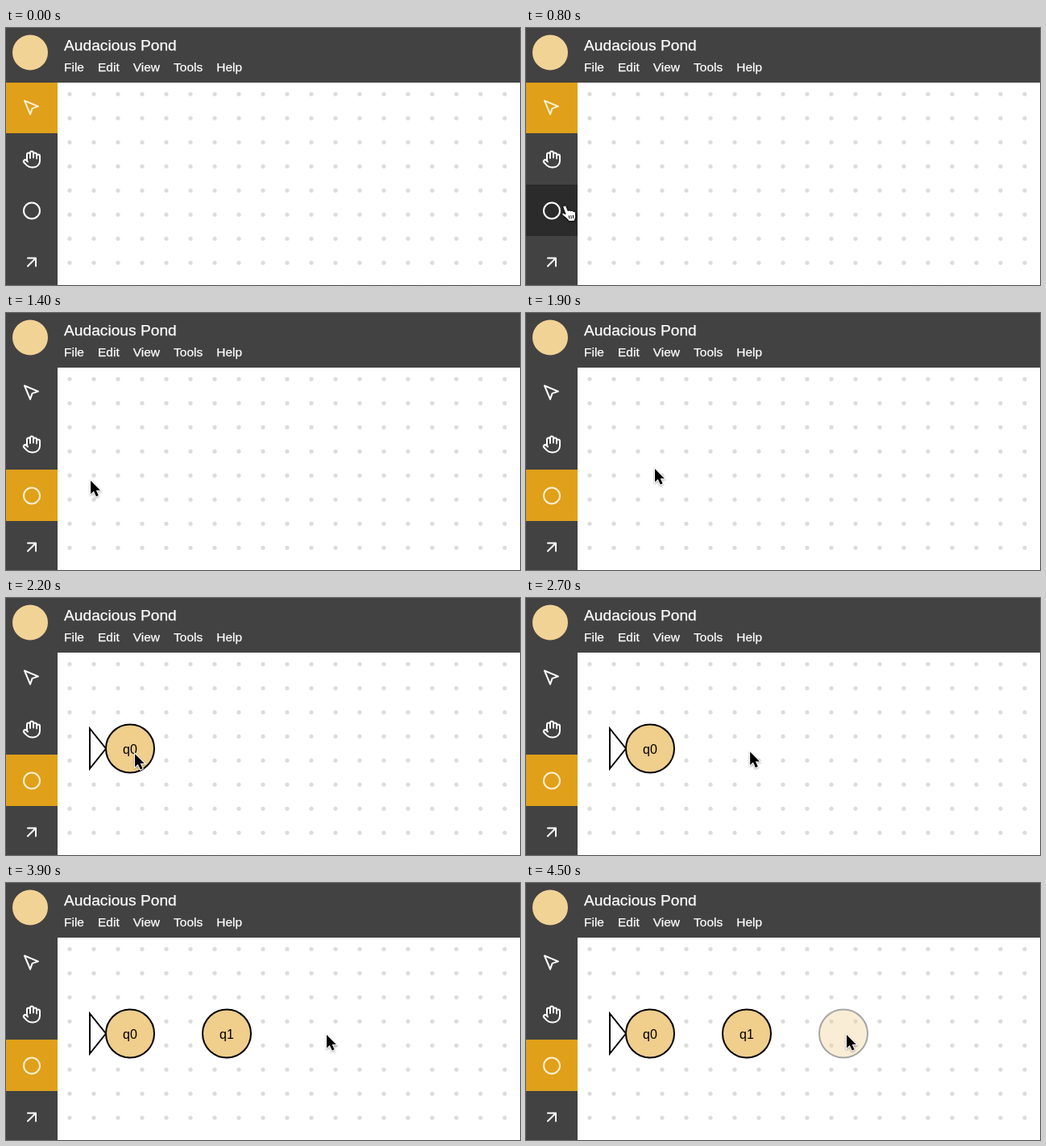
An HTML page for the animation above (4.6 s loop, 638 by 320 pixels).

```html
<!DOCTYPE html>
<html lang="en">
<head>
<meta charset="utf-8">
<title>Audacious Pond</title>
<style>
  html, body { margin: 0; width: 100%; height: 100%; overflow: hidden; background: #fff; }
  svg { display: block; }
  text { font: 15.5px "Liberation Sans", Arial, sans-serif; }
  .title { font-size: 19.2px; }
  .light { fill: #fff; stroke: #fff; stroke-width: .25; }
  .row rect { fill: none; }
  .row.hover rect { fill: #2b2b2b; }
  .row.on rect { fill: #e0a01a; }
  .icon { fill: none; stroke: #fff; stroke-width: 2; stroke-linecap: round; stroke-linejoin: round; }
  .row.on .icon { stroke: #fbf0d4; }
  .state { stroke: #000; stroke-width: 2; fill: #f0ce8c; }
  .state text { font-size: 16px; fill: #000; stroke: none; text-anchor: middle; }
  .ghost { opacity: .35; }
  .ghost text { display: none; }
  .cursor { filter: drop-shadow(0 1px 1px rgba(0, 0, 0, .35)); }
</style>
</head>
<body>
<svg width="638" height="320" viewBox="0 0 638 320">
  <defs>
    <pattern id="grid" x="64" y="67" width="30" height="30" patternUnits="userSpaceOnUse">
      <circle cx="15" cy="15.300" r="2.600" fill="#dcdcdc"/>
    </pattern>
  </defs>
  <rect width="638" height="320" fill="#fff"/>
  <rect x="64" y="67" width="574" height="253" fill="url(#grid)"/>

  <g id="states"></g>

  <rect width="64" height="320" fill="#424242"/>
  <g id="tools"></g>

  <rect width="638" height="68" fill="#424242"/>
  <circle cx="30" cy="30.500" r="22" fill="#f2d396"/>
  <g class="light">
    <text class="title" x="72" y="28">Audacious Pond</text>
    <text x="72" y="54">File<tspan dx="17">Edit</tspan><tspan dx="17">View</tspan><tspan dx="17">Tools</tspan><tspan dx="17">Help</tspan></text>
  </g>

  <g id="ring" fill="none">
    <circle cx="43" cy="222" r="38" stroke="#fff" stroke-width="3"/>
    <circle cx="43" cy="222" r="38" stroke="#000" stroke-width="1.500"/>
  </g>
  <g id="arrow" class="cursor">
    <path d="M0 0V16.500L3.800 13L6.800 19.600L9.600 18.300L6.700 11.900H11.800Z" fill="#000" stroke="#fff" stroke-width="2" paint-order="stroke"/>
  </g>
  <g id="hand" class="cursor">
    <path d="M-3.200 1C-3.500 -1 0 -1.800 1 .4L3.300 5.800C3.800 4.500 6.100 4.600 6.600 6C7.400 5 9.300 5.200 9.700 6.700C10.700 6 12.200 6.800 12.400 8.200L12.800 13L11.300 18.500H4L2.500 16L-3.700 11C-5.200 9.400 -3.300 7.600 -1.600 8.800L0 10Z" fill="#fff" stroke="#000" stroke-linejoin="round"/>
    <path d="M4.200 11.500l.8 4M6.800 11.300l.6 4M9.400 11l.4 4" fill="none" stroke="#000"/>
  </g>
</svg>
<script>
  const LOOP = 4600, STEP = 100, SIDE = 64, TOP = 67;
  const icons = [
    "M3 3l7.07 16.97 2.51-7.39 7.39-2.51z",
    "M18 11V6a2 2 0 0 0-4 0M14 10V4a2 2 0 0 0-4 0v2M10 10.5V6a2 2 0 0 0-4 0v8M18 8a2 2 0 1 1 4 0v6a8 8 0 0 1-8 8h-2c-2.8 0-4.5-.86-5.99-2.34l-3.6-3.6a2 2 0 0 1 2.83-2.82L7 15",
    "M2 12a10 10 0 1 0 20 0a10 10 0 1 0-20 0",
    "M7 17L17 7M7 7h10v10"
  ];
  const entry = { x: 242, y: 302 };
  const moves = [
    { from: 100, to: 600, x: 24, y: 197 },
    { from: 700, to: 800, x: 49, y: 222 },
    { from: 800, to: 1000, x: 45, y: 225 },
    { from: 1260, to: 1900, x: 160, y: 194 },
    { from: 2200, to: 2900, x: 281, y: 191.5 },
    { from: 3300, to: 3900, x: 398, y: 189 }
  ];

  const el = id => document.getElementById(id);
  const show = (node, on) => { node.style.display = on ? "" : "none"; };
  const easeOut = k => 1 - (1 - k) ** 3;
  const rowTop = i => TOP + SIDE * i;

  el("tools").innerHTML = icons.map((d, i) => `
    <g class="row" transform="translate(0 ${rowTop(i)})">
      <rect width="${SIDE}" height="${SIDE}"/>
      <path class="icon" transform="translate(20 20.5)" d="${d}"/>
    </g>`).join("");

  el("states").innerHTML = [0, 1, 2].map(i => `
    <g class="state" transform="translate(${154 + 120 * i} 187.5)">
      ${i ? "" : '<path d="M-50 -25V25L-30 0Z" fill="#fff"/>'}
      <circle r="30"/>
      <text y="6">q${i}</text>
    </g>`).join("");

  const rows = [...el("tools").children];
  const states = [...el("states").children];

  function tipAt(t) {
    let { x, y } = entry;
    for (const m of moves) {
      if (t < m.from) break;
      const k = easeOut(Math.min(1, (t - m.from) / (m.to - m.from)));
      x += (m.x - x) * k;
      y += (m.y - y) * k;
    }
    return { x, y };
  }

  function draw(now) {
    const t = Math.floor((now % LOOP) / STEP) * STEP;
    const { x, y } = tipAt(t);
    const visible = t >= moves[0].from;
    const inside = visible && x < SIDE;

    rows.forEach((row, i) => {
      const over = y >= rowTop(i) && y < rowTop(i + 1);
      row.classList.toggle("hover", inside && over);
    });
    rows[0].classList.toggle("on", t < 1300);
    rows[2].classList.toggle("on", t >= 1000);

    // each state is pressed as a ghost, then released
    states.forEach((state, i) => {
      const press = 2000 + 1100 * i;
      show(state, t >= press);
      state.classList.toggle("ghost", t < Math.min(press + 200, LOOP) || i === 2);
    });

    show(el("ring"), t >= 1000 && t < 1300);
    show(el("hand"), inside);
    show(el("arrow"), visible && !inside);
    for (const id of ["hand", "arrow"])
      el(id).setAttribute("transform", `translate(${x} ${y})`);
  }

  const start = performance.now();
  function tick() {
    draw(performance.now() - start);
    requestAnimationFrame(tick);
  }
  tick();
</script>
</body>
</html>
```
